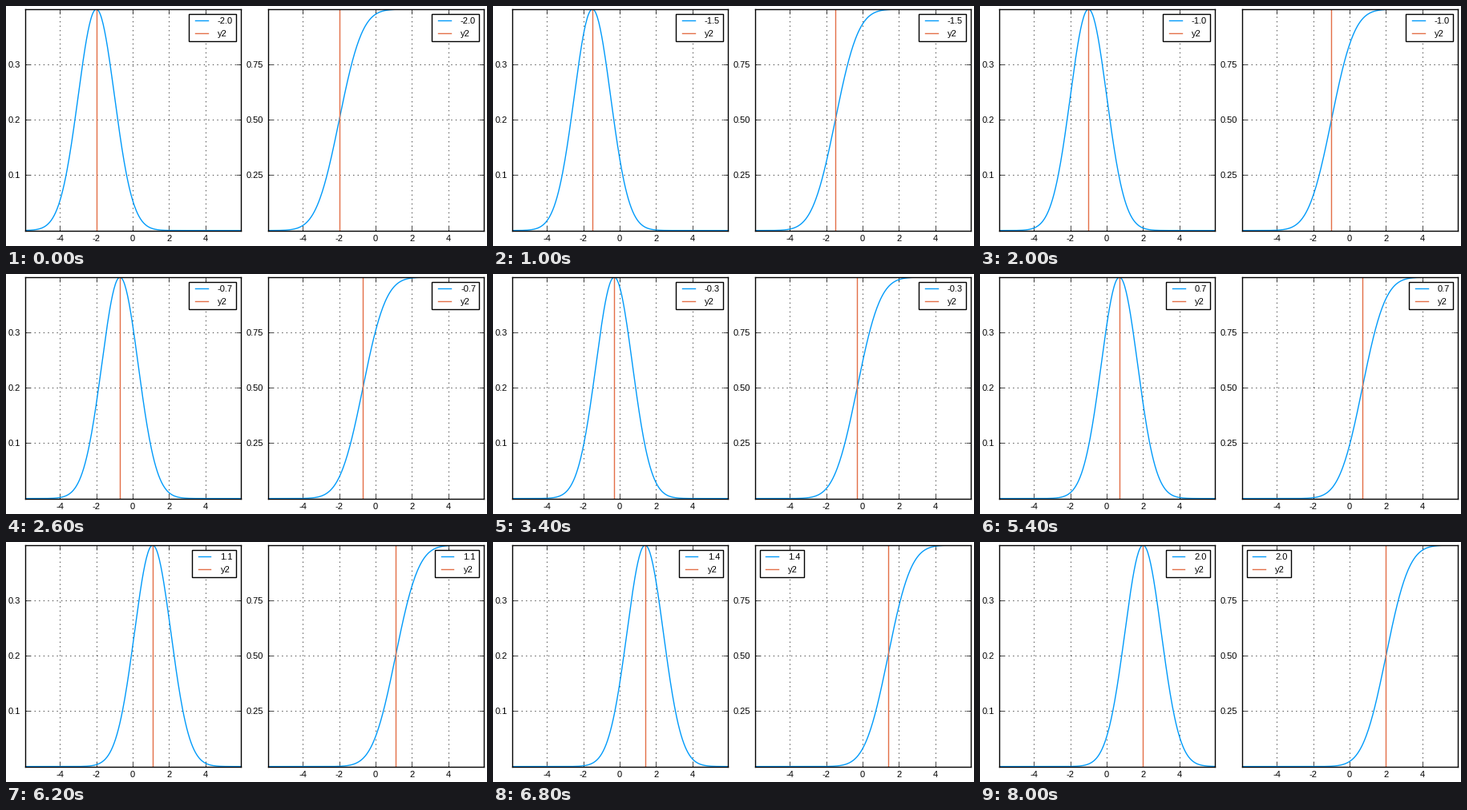
Animation, 600 px wide and 300 px high, one loop 8.2 s. Source, as a matplotlib script:

```python
import math

import matplotlib.pyplot as plt
import numpy as np
from matplotlib.animation import FuncAnimation

W, H, DPI = 600, 300, 100
FRAMES, STEP_MS = 41, 200
X_MIN, X_MAX = -5.91, 5.95
BLUE, ORANGE = "#009afa", "#e36f47"

plt.rcParams.update({
    "font.family": "Liberation Sans",
    "font.size": 8,
    "axes.linewidth": 1.0,
    "axes.axisbelow": True,
    "lines.scale_dashes": False,
})


def pdf(z):
    return np.exp(-z * z / 2) / math.sqrt(2 * math.pi)


def cdf(z):
    return 0.5 * (1 + np.vectorize(math.erf)(z / math.sqrt(2)))


class Panel:
    x = np.linspace(X_MIN, X_MAX, 300)

    def __init__(self, fig, left, func, ytick_step):
        self.func = func
        top = func(np.array([0.0, 40.0])).max()
        ax = fig.add_axes([left / W, 19.4 / H, 269 / W, 276.6 / H])
        ax.set_xlim(X_MIN, X_MAX)
        ax.set_ylim(0, top)
        xticks = range(-4, 5, 2)
        ax.set_xticks(xticks, [str(t) for t in xticks])
        ax.set_yticks([ytick_step * k for k in (1, 2, 3)])
        ax.tick_params(direction="in", length=4, width=0.5, pad=4,
                       top=True, right=True)
        ax.grid(True, color="black", linewidth=0.5, linestyle=(0, (1, 3)))
        self.curve, = ax.plot([], [], color=BLUE, lw=1, label="0.0")
        self.mean, = ax.plot([0, 0], [0, top], color=ORANGE, lw=1, label="y2")
        self.legend = ax.legend(
            loc="upper right", fontsize=8, numpoints=2, fancybox=False,
            framealpha=1, edgecolor="black", borderpad=0.4,
            labelspacing=0.5, handlelength=2, handletextpad=0.8,
            borderaxespad=0.5)
        self.legend.get_frame().set_linewidth(1)

    def update(self, mu, loc):
        self.curve.set_data(self.x, self.func(self.x - mu))
        self.mean.set_xdata([mu, mu])
        self.legend.get_texts()[0].set_text(f"{mu:.1f}")
        self.legend.set_loc(loc)


fig = plt.figure(figsize=(W / DPI, H / DPI), dpi=DPI, facecolor="white")
density = Panel(fig, 24, pdf, 0.1)
cumulative = Panel(fig, 327, cdf, 0.25)


def update(i):
    mu = (i - 20) / 10
    density.update(mu, "upper right")
    # The legend moves aside once the curve would run through it.
    cumulative.update(mu, "upper right" if mu < 1.25 else "upper left")
    return []


anim = FuncAnimation(fig, update, frames=FRAMES, interval=STEP_MS,
                     repeat=True, repeat_delay=0, blit=False)
plt.show()
```
